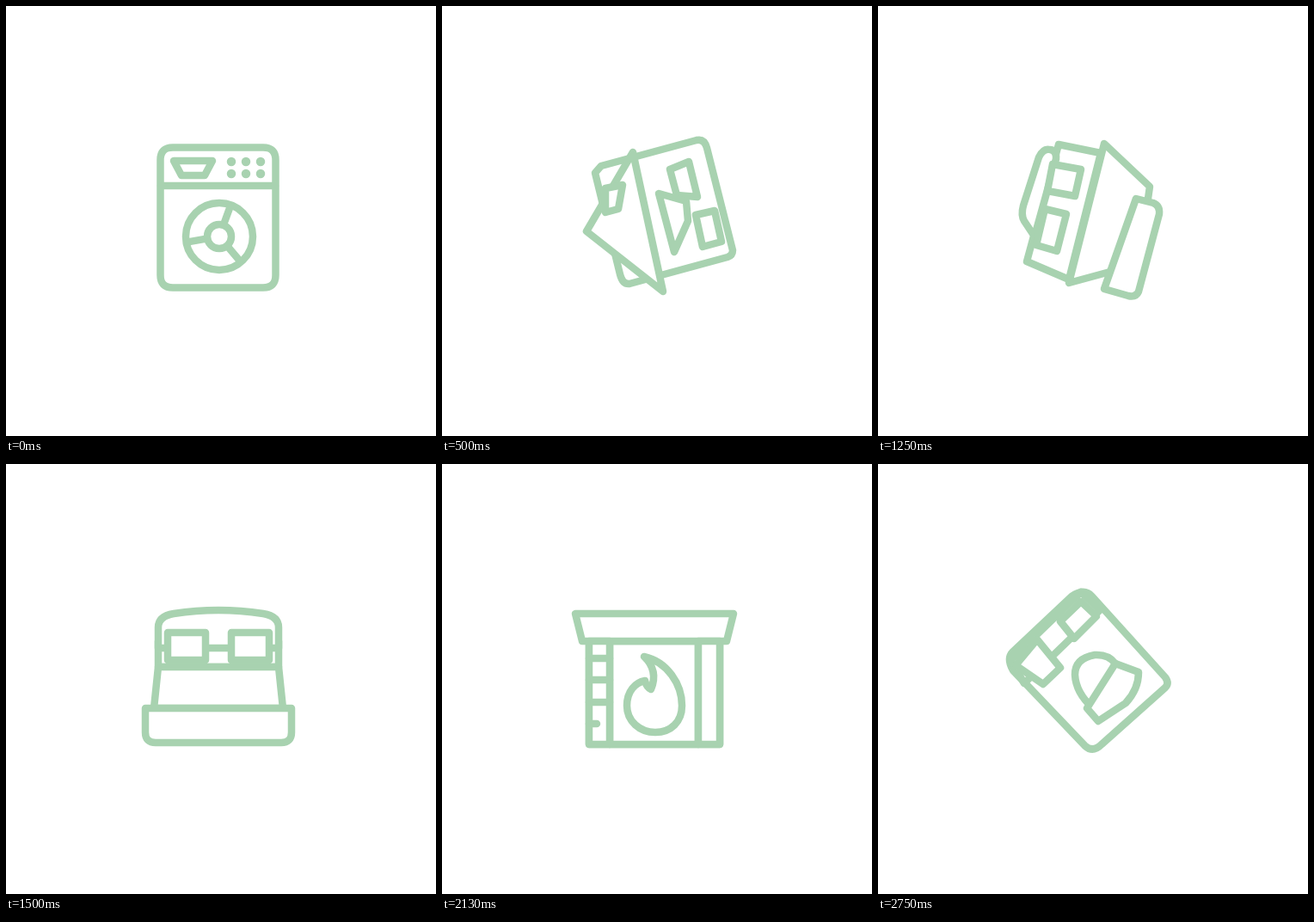
An HTML page with a canvas that plays this animation: 500x500 px, repeating every 2870 ms.

```html
<!DOCTYPE html>
<html>
<head>
<meta charset="utf-8">
<style>
html, body { margin: 0; width: 100%; height: 100%; overflow: hidden; background: #fff; }
canvas { display: block; width: 100vw; height: 100vh; }
</style>
</head>
<body>
<canvas id="stage" width="500" height="500"></canvas>
<script>
const ctx = document.getElementById('stage').getContext('2d');
const LOOP = 2870, STEPS = 23, N = 72, CX = 248, CY = 246;

const rect = (x, y, x2, y2) => `M${x},${y}H${x2}V${y2}H${x}Z`;
const poly = (...pts) => 'M' + pts.join(' ') + 'Z';
const ring = (x, y, r) => `M${x + r},${y}a${r},${r} 0 1 1 ${-2 * r},0a${r},${r} 0 1 1 ${2 * r},0Z`;

const cabinet = 'M194,164.5H299Q313.5,164.5 313.5,179V313Q313.5,327.5 299,327.5H194Q179.5,327.5 179.5,313V179Q179.5,164.5 194,164.5Z';
const drawer = poly(195, 180, 240, 180, 231, 197, 204, 197);
const buttons = rect(262, 181, 296, 195);
const drum = ring(248, 268, 39), hub = ring(248, 268, 14);

// Each pose holds six outlines in paint order and the turn (degrees) at which they are seen.
const poses = [
  { turn: 0, shapes: [ // washing machine
    cabinet, buttons, 'M180,209H313Z', hub, drawer, drum] },
  { turn: 77, shapes: [
    'M185,186L296,156Q305,154 308,165L338,284Q338,290 332,292L218,323Q210,324 207,312L178,194Z',
    poly(295, 243, 317, 238, 325, 274, 303, 280),
    poly(222, 170, 168, 262, 257, 332),
    poly(190, 212, 210, 208, 205, 236, 190, 240),
    poly(265, 190, 287, 181, 297, 222, 273, 220),
    poly(252, 218, 284, 227, 286, 250, 270, 286)] },
  { turn: 180, shapes: [ // house
    rect(172, 230, 324, 320), rect(191, 302, 237, 320),
    poly(247, 154, 349, 230, 144, 230),
    poly(298, 190, 298, 175, 324, 175, 324, 210),
    rect(251, 258, 296, 284), rect(200, 257, 228, 302)] },
  { turn: 288, shapes: [
    poly(210, 161, 259, 171, 222, 318, 173, 297),
    'M187,176Q192,165 200,167Q208,168 207,178L182,268L170,250Q166,243 169,232Z',
    poly(263, 160, 316, 210, 303, 300, 222, 322),
    'M300,224L320,229Q328,232 327,242L303,332Q300,339 291,337L263,329Z',
    poly(194, 236, 219, 242, 208, 285, 184, 278),
    poly(203, 184, 236, 190, 229, 221, 197, 215)] },
  { turn: 360, shapes: [ // bed
    rect(177, 206, 317, 236),
    'M177,214V190Q177,177 195,174Q247,166 299,174Q317,177 317,190V214Z',
    poly(177, 236, 317, 236, 322, 284, 172, 284),
    'M162,284H332V312Q332,324 320,324H174Q162,324 162,312Z',
    rect(262, 196, 306, 228), rect(188, 196, 232, 228)] },
  { turn: 420, shapes: [
    poly(180, 197, 241, 168, 309, 284, 249, 325),
    'M240,164L272,161Q290,170 305,195Q330,235 328,262L308,282Z',
    poly(290, 234, 314, 227, 318, 240, 295, 245),
    'M145,206L174,192L252,333L228,350Q220,354 214,346L140,218Q137,210 145,206Z',
    poly(270, 251, 310, 235, 325, 266, 290, 285),
    poly(236, 184, 268, 170, 288, 196, 252, 217)] },
  { turn: 540, shapes: [ // fireplace
    rect(171, 206, 323, 326), rect(195, 206, 298, 326),
    'M235,224C262,230 279,256 279,281C279,300 266,312 248,312C230,312 215,299 215,281C215,264 225,254 236,252Q238,260 243,262Q252,240 235,224Z',
    poly(155, 174, 339, 174, 331, 206, 163, 206),
    rect(171, 206, 195, 326), rect(298, 206, 323, 326)] },
  { turn: 676, shapes: [
    'M225,154Q240,144 249,154L334,248Q339,255 334,260L260,326Q250,336 241,328L157,240Q149,226 157,218Z',
    poly(236, 149, 258, 170, 170, 255, 154, 228),
    'M276,232Q268,221 252,222Q229,226 229,245Q230,266 250,284Z',
    poly(160, 234, 185, 204, 212, 237, 192, 256),
    poly(212, 183, 236, 160, 254, 177, 228, 203),
    'M276,232L303,242Q303,262 288,278L256,299L243,284Z'] },
  { turn: 720, shapes: [
    cabinet, rect(180, 165, 313, 209), drum, drawer, buttons, hub] }
];

// Position along the poses at every step of the loop.
const track = [0, 0, 0, .3, 1, 1.56, 2, 2, 2, 2.25, 3, 3.75, 4, 4, 4, 5, 5.65, 6, 6, 6, 6.08, 6.45, 7];

function rotate([x, y], deg) {
  const a = deg * Math.PI / 180, c = Math.cos(a), s = Math.sin(a);
  x -= CX; y -= CY;
  return [CX + x * c - y * s, CY + x * s + y * c];
}

function sample(d, turn) {
  const path = document.createElementNS('http://www.w3.org/2000/svg', 'path');
  path.setAttribute('d', d);
  const len = path.getTotalLength();
  return Array.from({ length: N }, (_, i) => {
    const p = path.getPointAtLength(len * i / N);
    return rotate([p.x, p.y], -turn);
  });
}

// Reorders the points of an outline so that they lie closest to those of the one before.
function align(pts, ref) {
  let best, least = Infinity;
  for (const list of [pts, [...pts].reverse()])
    for (let s = 0; s < N; s++) {
      let cost = 0;
      for (let i = 0; i < N; i++) {
        const p = list[(i + s) % N];
        cost += (p[0] - ref[i][0]) ** 2 + (p[1] - ref[i][1]) ** 2;
      }
      if (cost < least) {
        least = cost;
        best = [...list.slice(s), ...list.slice(0, s)];
      }
    }
  return best;
}

poses.forEach((pose, n) => {
  pose.pts = pose.shapes.map((d, i) => {
    const pts = sample(d, pose.turn);
    return n ? align(pts, poses[n - 1].pts[i]) : pts;
  });
});

const mix = (a, b, u) => a + (b - a) * u;

function outline(d) {
  const path = new Path2D(d);
  ctx.fill(path);
  ctx.stroke(path);
}

function drawMorph(pos) {
  const n = Math.floor(pos), u = pos - n, a = poses[n], b = poses[n + 1];
  const turn = mix(a.turn, b.turn, u);
  a.pts.forEach((pts, i) => {
    outline(poly(...pts.map((p, j) => {
      const q = b.pts[i][j];
      return rotate([mix(p[0], q[0], u), mix(p[1], q[1], u)], turn).map(v => v.toFixed(2));
    })));
  });
}

function drawWasher(k) {
  [cabinet, 'M180,209H313', drawer, drum].forEach(outline);
  for (let i = 0; i < 3; i++) {
    const a = (i * 120 - 70 + k * 40) * Math.PI / 180, c = Math.cos(a), s = Math.sin(a);
    outline(`M${248 + 14 * c},${268 + 14 * s}L${248 + 37 * c},${268 + 37 * s}`);
  }
  outline(hub);
  ctx.lineWidth = 10.5;
  for (const y of [181, 195])
    for (const x of [262, 279, 296]) outline(`M${x},${y}h.01`);
}

function drawFireplace(k) {
  const [body, hearth, flame, ...rest] = poses[6].shapes;
  [body, hearth, ...rest, 'M171,226H195M171,251H195M171,277H195M171,302H180'].forEach(outline);
  const sway = .07 * Math.sin((k - 17) * 2);
  ctx.save();
  ctx.transform(1, 0, sway, 1, -312 * sway, 0);
  outline(flame);
  ctx.restore();
}

function draw(k) {
  const pos = track[k];
  ctx.fillStyle = '#fff';
  ctx.fillRect(0, 0, 500, 500);
  ctx.strokeStyle = '#a8d2b0';
  ctx.lineWidth = 8.5;
  ctx.lineJoin = ctx.lineCap = 'round';
  if (pos === 0) drawWasher(k);
  else if (pos === 6) drawFireplace(k);
  else if (Number.isInteger(pos)) poses[pos].shapes.forEach(outline);
  else drawMorph(pos);
}

function tick() {
  draw(Math.floor(performance.now() % LOOP / LOOP * STEPS));
  requestAnimationFrame(tick);
}
tick();
</script>
</body>
</html>
```
